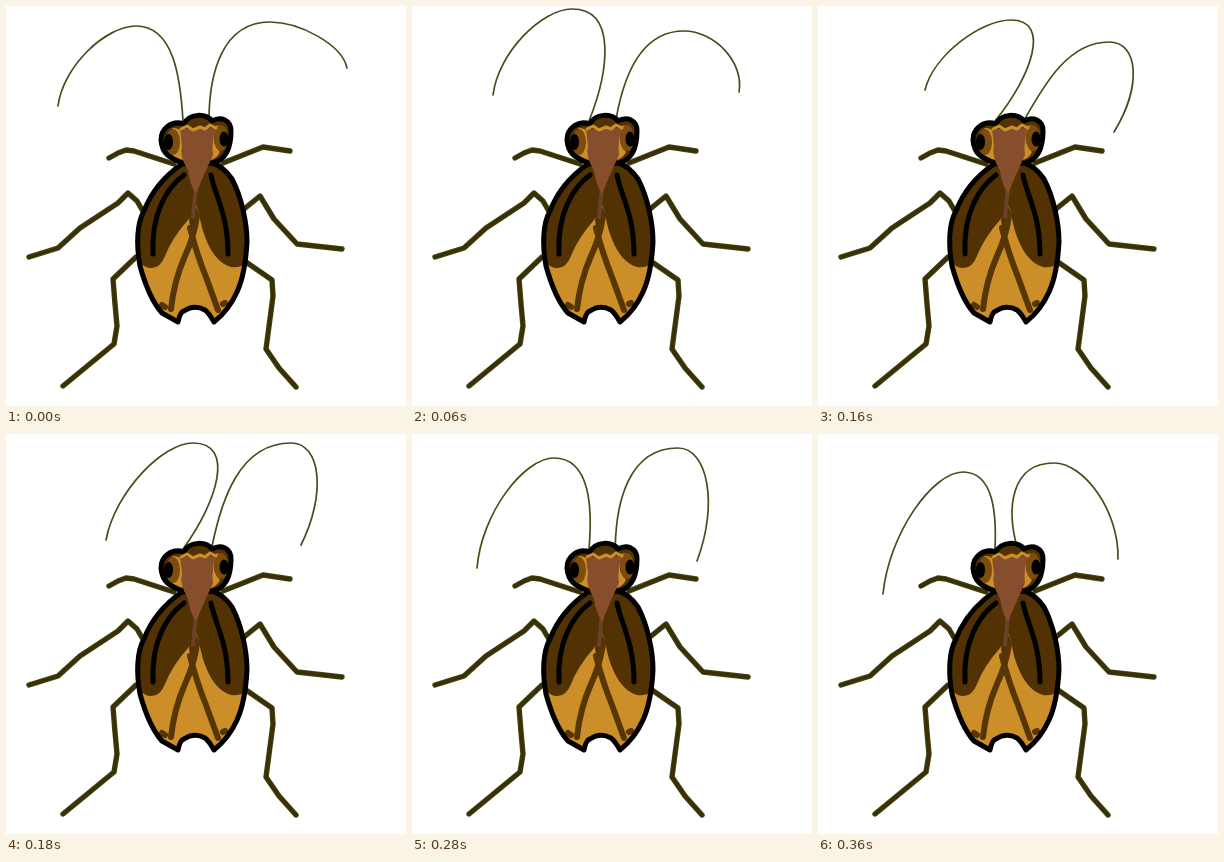
An HTML page that plays this animation: 400 by 400 pixels, repeating every 0.42 s.

```html
<!DOCTYPE html>
<html lang="en">
<head>
<meta charset="utf-8">
<title>Beetle</title>
<style>
html, body { margin: 0; width: 100%; height: 100%; overflow: hidden; background: #fff; }
svg { display: block; width: 100vw; height: 100vh; stroke-linecap: round; stroke-linejoin: round; }
.line, .ink, .feeler { fill: none; }
.feeler { stroke: #41501b; stroke-width: 1.7; }
.ink { stroke: #000; stroke-width: 5; }
.dark { fill: #523203; }
.gold { fill: #cb8e29; }
.ring { fill: #7c4d0c; }
.snout { fill: #864e2c; }
.vein { stroke: #573606; stroke-width: 6; }
</style>
</head>
<body>
<svg viewBox="0 0 400 400">
  <defs>
    <path id="legs" d="M103 152L112 147L120 144L128 145L168 158M217 157L257 141L264 142L284 145
      M23 251L52 242L74 222L112 197L122 187L131 195L138 207M238 203L254 190L268 213L291 238L336 243
      M130 251L107 273L109 298L111 320L108 338L57 380M240 256L266 274L267 290L260 343L273 362L290 381"/>
    <path id="shell" d="M176 158C160 169 146 184 138 205C131 217 130 238 134 260C139 278 147 297 156 307L172 316
      Q174 306 178 305Q188 298 199 304Q203 307 208 316Q223 304 231 286C238 271 240 254 241 236
      C241 218 236 192 226 173Q217 160 206 157Z"/>
    <path id="head" d="M178 118C183 107 200 107 206 115C215 110 225 114 225 125C225 143 219 154 207 157
      L176 157C164 152 156 148 155 134C155 122 166 114 178 118Z"/>
    <clipPath id="inside"><use href="#shell"/></clipPath>
  </defs>

  <use href="#legs" class="line" stroke="#3b4610" stroke-width="5.4"/>
  <use href="#legs" class="line" stroke="#3d2e08" stroke-width="3.4"/>
  <path class="feeler" id="left"/>
  <path class="feeler" id="right"/>

  <use href="#shell" class="gold"/>
  <g clip-path="url(#inside)">
    <path class="dark" d="M125 150H195L189 204L182 214Q166 232 159 250Q154 263 144 262Q136 261 130 252Z"/>
    <path class="dark" d="M185 150H250V250Q238 263 225 261Q211 257 202 238Q195 223 193 206L186 190Z"/>
    <path class="dark" d="M187 195L183 214L187 239L194 208Z"/>
    <path class="line vein" d="M191 210Q188 231 179 250Q168 275 165 303M184 222Q190 246 200 271L212 304M156 299L159 301M217 298L219 297"/>
    <path class="line" d="M190 180L187 211" stroke="#6c4029" stroke-width="4"/>
  </g>
  <use href="#shell" class="ink"/>
  <path class="ink" d="M178 169C160 182 145 209 147 248M205 169C209 190 222 208 222 248"/>

  <use href="#head" class="dark"/>
  <path class="gold" d="M166 122Q174 121 176 128L178 154Q169 152 165 148Q180 136 166 122Z
    M213 119Q206 120 207 128L205 154Q211 152 214 146Q202 133 213 119Z"/>
  <ellipse class="ring" cx="167" cy="136" rx="7" ry="13"/>
  <ellipse class="ring" cx="215" cy="132" rx="7" ry="13"/>
  <use href="#head" class="ink"/>
  <ellipse cx="162.500" cy="136" rx="4.500" ry="8"/>
  <ellipse cx="218" cy="133" rx="4.500" ry="7.500"/>
  <path class="snout" d="M174 123L210 122Q205 135 207 149L197 171L190 188Q184 179 182 165Q173 149 176 140Z"/>
  <path class="line" d="M175 123L181 120L187 124L194 121L199 123L204 119L210 122" stroke="#cb8e29" stroke-width="3"/>
</svg>
<script>
const step = 60;

// Each pose is the feeler's highest point and its tip; the root follows the top by "sway".
const feelers = [
  { id: "left", out: -1, root: [177, 115], sway: 0, inner: 0, poses: [
    [130,20, 52,100], [160,3, 81,89], [193,14, 107,84], [187,9, 100,106],
    [142,24, 65,134], [138,62, 105,192], [145,38, 65,160]] },
  { id: "right", out: 1, root: [166, 113], sway: 0.14, inner: 10, poses: [
    [264,16, 341,62], [272,25, 327,86], [291,36, 296,126], [285,9, 295,111],
    [266,14, 285,127], [232,16, 270,138], [236,29, 300,125]] }
];
const bulge = 30;

// Two cubic arcs: root to top, then top to tip, level where they meet.
function arch({ out, root, sway, inner }, [topX, topY, tipX, tipY]) {
  const x = root[0] + sway * topX, y = root[1];
  const rise = y - topY, lean = topX - x;
  const rootX = x + 0.6 * lean - out * (0.27 * rise + inner);
  const innerX = topX - out * (0.4 * rise + inner);
  const outerX = topX + out * bulge;
  const endX = tipX - 0.45 * (tipX - topX) + out * bulge;
  return `M${x} ${y}C${rootX} ${y - 0.45 * rise} ${innerX} ${topY} ${topX} ${topY}` +
    `C${outerX} ${topY} ${endX} ${(topY + tipY) / 2} ${tipX} ${tipY}`;
}

const start = performance.now();

function draw(now) {
  const tick = Math.floor(Math.max(0, now - start) / step);
  for (const feeler of feelers) {
    const pose = feeler.poses[tick % feeler.poses.length];
    document.getElementById(feeler.id).setAttribute("d", arch(feeler, pose));
  }
  requestAnimationFrame(draw);
}
draw(start);
</script>
</body>
</html>
```
